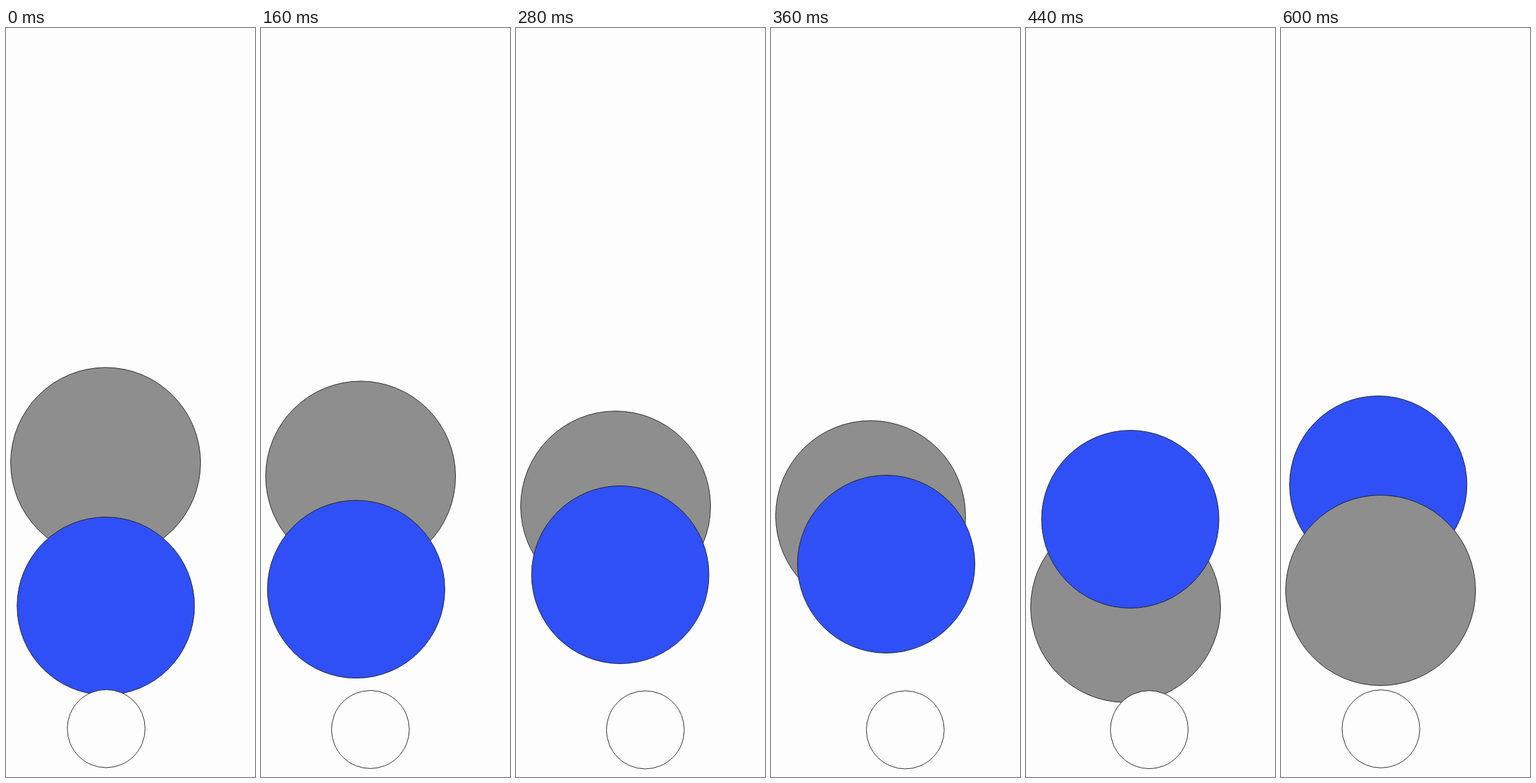
Write an HTML page with a canvas that moves like this. It is 400 px wide and 1200 px high and loops after 640 ms.

```html
<!DOCTYPE html>
<html>
<head>
<meta charset="utf-8">
<style>
html, body { margin: 0; height: 100%; overflow: hidden; background: #fdfdfd; }
canvas { display: block; }
</style>
</head>
<body>
<canvas id="stage" width="400" height="1200"></canvas>
<script>
const ctx = document.getElementById('stage').getContext('2d');
const STEP = 40, STEPS = 16;
const JUMP = 10; // the two big balls leap past each other here
const SWAP = 14; // the grey ball comes to the front here
const MID = 160;

const sigmoid = x => 1 / (1 + Math.exp(-x));
const rise = t => sigmoid(0.77 * (t - 5.4));

const grey = {
  r: 152.5, fill: '#8e8e8e',
  x: () => MID,
  y: t => t < JUMP ? 695 + 92 * rise(t) : 892 + 36 * 2 ** ((11 - t) / 2)
};

const blue = {
  r: 142.5, fill: '#2e50f6',
  // A sway that swells and dies away.
  x: t => MID + 25 * Math.cos(2 * Math.PI * (t - 9) / 10.5) * Math.exp(-(((t - 9) / 4.5) ** 2)),
  y: t => t < JUMP ? 926 - 6.1 * t - 0.15 * t * t : 688 + 99 * 0.816 ** (t - 11)
};

const white = {
  r: 62.5, fill: '#fdfdfd',
  x: t => MID + 62 * (rise(t) - sigmoid(1.3 * (t - 11.4))),
  y: t => 1122.5 + 2 * Math.sin(Math.PI * t / STEPS)
};

function drawBall(ball, t) {
  ctx.beginPath();
  ctx.arc(ball.x(t), ball.y(t), ball.r, 0, 2 * Math.PI);
  ctx.fillStyle = ball.fill;
  ctx.fill();
  ctx.stroke();
}

function draw(now) {
  const t = Math.floor(now / STEP) % STEPS;
  const balls = t < SWAP ? [grey, blue, white] : [blue, grey, white];
  ctx.fillStyle = '#fdfdfd';
  ctx.fillRect(0, 0, 400, 1200);
  ctx.strokeStyle = '#222';
  for (const ball of balls) drawBall(ball, t);
}

const start = performance.now();
function loop() {
  draw(performance.now() - start);
  requestAnimationFrame(loop);
}
loop();
</script>
</body>
</html>
```
